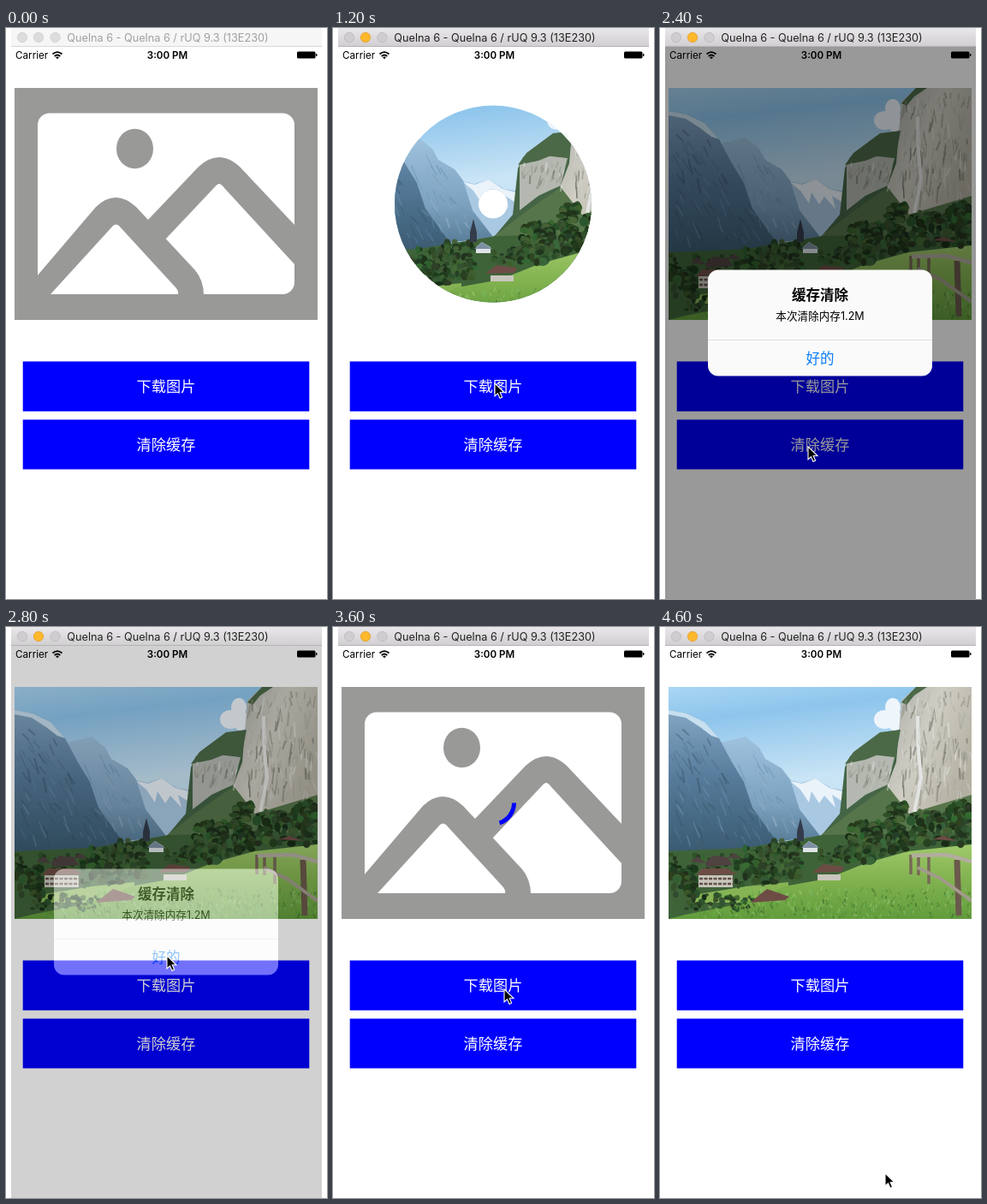
These frames come from a looping animation (375x667 px, 4.8 s). An HTML page:

```html
<!DOCTYPE html>
<html lang="zh">
<head>
<meta charset="utf-8">
<style>
html, body { margin: 0; width: 100%; height: 100%; overflow: hidden; background: #fff; }
svg { display: block; }
text { font-family: Inter, "Noto Sans CJK SC", "Noto Sans CJK", sans-serif; }
.mid { text-anchor: middle; }
.btn text { font-family: "Noto Sans CJK SC", "Noto Sans CJK", sans-serif; font-size: 17.2px; font-weight: 300; fill: #fff; }
</style>
</head>
<body>
<svg width="375" height="667" viewBox="0 0 375 667">
  <defs>
    <linearGradient id="bar" x2="0" y2="1"><stop stop-color="#e9e7e9"/><stop offset="1" stop-color="#d0ced0"/></linearGradient>
    <linearGradient id="sky" x2=".15" y2="1"><stop stop-color="#a9d6f3"/><stop offset=".15" stop-color="#8ec5ec"/><stop offset=".45" stop-color="#c9e4f5"/></linearGradient>
    <linearGradient id="far" x2="0" y2="1"><stop stop-color="#9fc2de"/><stop offset=".6" stop-color="#7ba1bf"/><stop offset="1" stop-color="#527690"/></linearGradient>
    <linearGradient id="near" x2="0" y2="1"><stop stop-color="#83a6c4"/><stop offset=".45" stop-color="#567b9a"/><stop offset="1" stop-color="#36566a"/></linearGradient>
    <linearGradient id="rock" x2="1" y2=".6"><stop stop-color="#a9aca7"/><stop offset=".5" stop-color="#cfcdc3"/><stop offset="1" stop-color="#b3b0a2"/></linearGradient>
    <linearGradient id="lawn" x2="0" y2="1"><stop stop-color="#a0c96b"/><stop offset=".45" stop-color="#83b350"/><stop offset="1" stop-color="#619c3c"/></linearGradient>
    <clipPath id="reveal"><path id="hole" clip-rule="evenodd"/></clipPath>
  </defs>

  <g id="blank">
    <path fill="#999997" d="M10 70H364V341H10z"/>
    <rect x="37" y="99.5" width="300" height="211.5" rx="14" fill="#fff"/>
    <g fill="#999997">
      <ellipse cx="150.5" cy="141" rx="21.5" ry="23.3"/>
      <path d="M166 224L225 162Q249 140 273 162L338 231V312H160z"/>
    </g>
    <path fill="#fff" d="M187 246L246 183.500Q249 180.500 252 183.500L337 276V297a14 14 0 0 1-14 14H187z"/>
    <path fill="#999997" d="M36 290L105 209Q128 187 152 209L221 283Q231 295 231 312H36z"/>
    <path fill="#fff" d="M52 311L125 231Q128.500 228 132 231L199 304Q202 308 201 311z"/>
    <circle id="arc" cx="187" cy="205.500" r="24.500" fill="none" stroke="#00f" stroke-width="5" pathLength="100"/>
  </g>

  <g id="photo" clip-path="url(#reveal)">
    <svg x="10" y="70" width="354" height="271" viewBox="10 70 354 271">
      <path fill="url(#sky)" d="M10 70H364V341H10z"/>
      <g fill="#eef5fb">
        <ellipse cx="262" cy="108" rx="12" ry="11"/>
        <ellipse cx="272" cy="94" rx="9" ry="11"/>
        <ellipse cx="274" cy="109" rx="9" ry="12"/>
      </g>
      <path fill="#a9c8e2" d="M148 178L165 182 182 177 200 188 219 191V250H150z"/>
      <path fill="#eaf3fa" d="M152 180L166 183 182 177 198 188 217 193 212 203 201 196 205 211 192 197 186 206 177 192 174 205 164 190z"/>
      <path fill="url(#far)" d="M66 136L84 132 100 128 116 141 123 154 142 165 152 178 163 213 187 244 70 260z"/>
      <path fill="url(#near)" d="M10 97L31 101 52 111 69 130 84 158 98 181 108 211 133 246V275H10z"/>
      <path fill="#c7dfef" d="M10 97L31 101 52 111 69 130 60 127 47 117 30 106 10 102z"/>
      <g id="strata"/>
      <path fill="#446546" d="M216 164L222 151 240 138 257 124 282 120 282 185 245 222 188 244 210 218z"/>
      <path fill="#b4b8b1" d="M218 160L240 148 274 152 266 184 240 196 218 213z"/>
      <path fill="url(#rock)" d="M282 86L299 70H364V215L290 220 270 202 264 189 276 158z"/>
      <path fill="#56754a" d="M187 244L222 217 266 186 291 218 364 196V270H187z"/>
      <path fill="#4c6947" d="M216 160L226 146 257 123 281 120 275 152 255 149 240 155zM282 88L299 70H312L297 80 288 91z"/>
      <g id="cracks"/>
      <path fill="none" stroke="#eceff0" stroke-width="4" d="M301 104L302 148 305 176 297 216" opacity=".75"/>
      <path fill="#3f6339" d="M10 262L100 258 190 243 364 240V341H10z"/>
      <path fill="#86b354" d="M45 312L100 303 150 298V322H40z"/>
      <path fill="url(#lawn)" d="M30 336L100 322 145 303 195 294 240 276 290 262 364 254V341H10z"/>
      <g id="trees"/>
      <g id="grass"/>
      <path fill="#343c4b" d="M160 250V239L164 223 168 239V250z"/>
      <path fill="#dfe5e8" d="M167 263V256L174 250 184 256V263z"/>
      <path fill="#7d8fa2" d="M165 258L174 250 186 258z"/>
      <path fill="#4f4241" d="M53 275L62 267 79 269 85 278 54 280zM35 274L44 268 53 276zM78 270L86 264 96 270z"/>
      <path fill="#c9c6bd" d="M45 290H85V304H45zM184 289H211V296H184z"/>
      <path fill="#6d4c45" d="M42 290L49 282H79L90 289zM178 287L191 277 215 280 212 286zM105 322L125 306 151 315 146 319zM318 248L331 244 348 250z"/>
      <path stroke="#5f5048" stroke-width="2.500" d="M46 294H86M46 300H86" stroke-dasharray="4 1.500"/>
      <g fill="none" stroke="#776857">
        <path stroke-width="3.500" d="M293 266V289M302 266V290M314 268V300"/>
        <path stroke-width="7" stroke="#6b5a4b" d="M347 272L349 337"/>
        <path stroke="#b3aca0" stroke-width="4.500" d="M294 267L335 266 364 274"/>
        <path stroke="#a19a8b" stroke-width="4" d="M301 281L328 294 364 320"/>
      </g>
    </svg>
  </g>

  <g class="btn mid">
    <path fill="#00f" d="M19.700 389.600H354.300V447.700H19.700zM19.700 457.400H354.300V515.600H19.700z"/>
    <text x="187" y="425">下载图片</text>
    <text x="187" y="493">清除缓存</text>
  </g>

  <text x="11" y="36" font-size="11.700">Carrier</text>
  <text class="mid" x="188.500" y="36" font-size="11.600" font-weight="600">3:00 PM</text>
  <g fill="none" stroke="#000" stroke-width="1.800">
    <path d="M54.500 30.500Q60 25.700 65.500 30.500M56.700 33Q60 30 63.300 33"/>
    <path stroke="none" fill="#000" d="M58 34.300Q60 32.700 62 34.300L60 36.300z"/>
  </g>
  <rect x="340" y="27.500" width="21.500" height="8" rx="1.500" fill="#000"/>
  <rect x="362" y="30" width="1.500" height="3" rx=".7" fill="#000"/>

  <g id="alert">
    <path fill="#000" opacity=".4" d="M6 22H369V667H6z"/>
    <rect x="56" y="282.500" width="262" height="124" rx="12" fill="#fafafa"/>
    <path stroke="#dcdce0" d="M56 364.500H318"/>
    <g class="mid">
      <text x="187" y="318" font-size="16.500" font-weight="600">缓存清除</text>
      <text x="187" y="341" font-size="12.600">本次清除内存1.2M</text>
      <text x="187" y="392" font-size="16.500" fill="#087cf8">好的</text>
    </g>
  </g>

  <path id="bar-bg" d="M6 0H369V22H6z"/>
  <path id="bar-edge" d="M6 21.500H369"/>
  <g stroke-width=".8">
    <circle class="dot" cx="19" cy="11" r="5.700"/>
    <circle class="dot" id="amber" cx="38" cy="11" r="5.700"/>
    <circle class="dot" cx="57.500" cy="11" r="5.700"/>
  </g>
  <text id="title" class="mid" x="189" y="15.700" font-size="12.700">Quelna 6 - Quelna 6 / rUQ 9.3 (13E230)</text>

  <path id="cursor" stroke="#fff" stroke-width="1.100" d="M0 0V15L3.500 11.800 6 17.500 8.600 16.300 6.200 10.800H11z"/>
</svg>
<script>
const $ = id => document.getElementById(id);
const set = (el, attrs) => { for (const k in attrs) el.setAttribute(k, attrs[k]); };

let seed = 7;
const rnd = (a, b) => a + (b - a) * ((seed = seed * 16807 % 2147483647) / 2147483647);

function add(parent, tag, attrs) {
  const el = document.createElementNS('http://www.w3.org/2000/svg', tag);
  set(el, attrs);
  parent.append(el);
}

// Foliage scattered in a box, from back to front.
function grove(n, x0, y0, x1, y1, size) {
  for (let i = 0; i < n; i++) {
    add($('trees'), 'ellipse', {
      cx: rnd(x0, x1), cy: y0 + (y1 - y0) * i / n, rx: rnd(.4, 1) * size, ry: rnd(.4, 1) * size,
      fill: `hsl(${rnd(95, 125)} ${rnd(24, 38)}% ${rnd(13, 31)}%)`
    });
  }
}
grove(60, 12, 266, 100, 303, 4);
grove(40, 12, 282, 44, 314, 6);
grove(45, 30, 313, 108, 330, 4);
grove(70, 99, 258, 135, 299, 6);
grove(60, 132, 250, 166, 294, 5);
grove(30, 185, 258, 215, 276, 4);
grove(90, 217, 229, 262, 274, 6);
grove(70, 265, 207, 288, 262, 6);
grove(90, 292, 216, 362, 254, 6);
grove(30, 338, 206, 364, 238, 6);

// Short strokes scattered in a box; `shade` gives each its colour.
function strokes(id, n, [x0, y0, x1, y1], dx, [dy0, dy1], shade, inside = () => true) {
  for (let i = 0; i < n; i++) {
    const x = rnd(x0, x1), y = rnd(y0, y1);
    const line = `M${x} ${y}l${rnd(dx[0], dx[1])} ${rnd(dy0, dy1)}`;
    if (inside(x, y)) add($(id), 'path', { d: line, stroke: shade(), 'stroke-width': rnd(.8, 2.2), opacity: .5 });
  }
}
const stone = () => `hsl(60 6% ${rnd(32, 92)}%)`;
strokes('cracks', 190, [282, 74, 363, 195], [-4, 3], [5, 20], stone, (x, y) => x + y > 372);
strokes('cracks', 45, [221, 156, 272, 184], [-6, 2], [4, 12], stone);
strokes('strata', 150, [10, 112, 130, 245], [3, 10], [6, 20],
  () => `hsl(207 28% ${rnd(30, 58)}%)`, (x, y) => x < y * .55 - 12);
strokes('strata', 50, [90, 140, 170, 235], [3, 9], [6, 18],
  () => `hsl(207 32% ${rnd(50, 72)}%)`, (x, y) => x > y * .55 - 5 && x < y * .6 + 28);
strokes('grass', 460, [45, 308, 364, 341], [-3, 3], [-6, -2],
  () => `hsl(${rnd(85, 115)} 42% ${rnd(25, 68)}%)`, (x, y) => x > 440 - y * 1.1 || y > 328);

const LOOP = 4800, STEP = 200;
// [step, x, y]: where the pointer rests from that step on
const stops = [[2, 189, 415], [10, 182, 452], [11, 173, 489], [13, 188, 384],
  [15, 203, 412], [16, 202, 417], [17, 200, 423], [23, 263, 638]];
const ease = s => s * s * (3 - 2 * s);
const ring = r => `M${187 - r} 205.500a${r} ${r} 0 1 0 ${2 * r} 0a${r} ${r} 0 1 0 ${-2 * r} 0z`;
const show = (el, on) => { el.style.display = on ? '' : 'none'; };

function draw(step) {
  const active = step >= 3;
  set($('bar-bg'), { fill: active ? 'url(#bar)' : '#f6f6f6' });
  set($('bar-edge'), { stroke: active ? '#b5b3b5' : '#d8d8d8' });
  set($('title'), { fill: active ? '#222' : '#a0a0a0' });
  for (const dot of document.querySelectorAll('.dot'))
    set(dot, { fill: active ? '#cfcdcf' : '#dcdcdc', stroke: active ? '#bbb9bb' : '#d0d0d0' });
  if (active) set($('amber'), { fill: '#fdb82c', stroke: '#e2a032' });

  // Each download: two steps of progress, then the ring opens into the picture.
  const k = step < 18 ? step - 4 : step - 18;
  const loaded = k >= 2;
  show($('blank'), !loaded);
  show($('photo'), loaded);
  show($('arc'), k >= 0);
  set($('arc'), { 'stroke-dasharray': `${k ? 70 : 20} 100` });
  if (loaded) {
    const p = ease(Math.min(1, .32 + .22 * (k - 2)));
    set($('hole'), { d: ring(27.5 + 362 * p) + ring(22.5 * (1 - p)) });
  }

  show($('alert'), step >= 12 && step < 15);
  set($('alert'), { opacity: step === 14 ? .45 : 1 });

  const stop = stops.filter(s => s[0] <= step).pop();
  show($('cursor'), stop);
  if (stop) set($('cursor'), { transform: `translate(${stop[1]} ${stop[2]})` });
}

let last = -1;
const start = performance.now();
function tick() {
  const step = Math.floor((performance.now() - start) % LOOP / STEP);
  if (step !== last) draw(last = step);
  requestAnimationFrame(tick);
}
tick();
</script>
</body>
</html>
```
